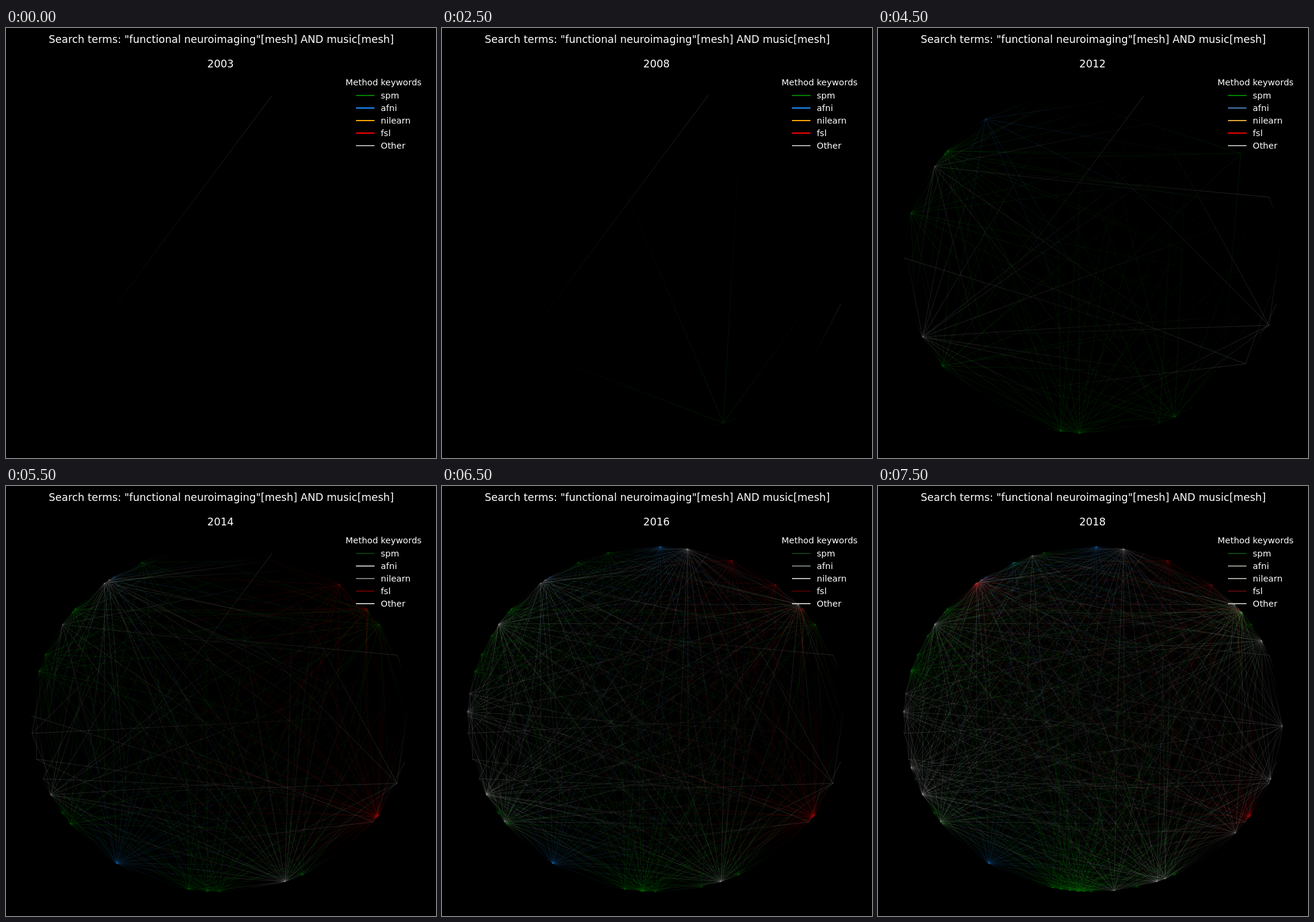
Write an HTML page with a canvas that moves like this. It is 720 px wide and 720 px high and loops after 8000 ms.

```html
<!DOCTYPE html>
<html lang="en">
<head>
<meta charset="utf-8">
<title>Search terms by year</title>
<style>
  html, body { margin: 0; width: 100%; height: 100%; overflow: hidden; background: #000; }
  canvas, svg { position: absolute; left: 0; top: 0; width: 720px; height: 720px; }
  text { font-family: "DejaVu Sans", Verdana, sans-serif; font-size: 14.48px; fill: #fff; }
  .big { font-size: 17.38px; text-anchor: middle; }
  #keys line { stroke-width: 2; }
</style>
</head>
<body>
<canvas id="net" width="720" height="720"></canvas>
<svg viewBox="0 0 720 720">
  <text class="big" x="360.5" y="25">Search terms: "functional neuroimaging"[mesh] AND music[mesh]</text>
  <text class="big" id="year" x="359.2" y="66">2003</text>
  <text x="568.6" y="96">Method keywords</text>
  <g id="keys"></g>
</svg>
<script>
const FIRST = 2003, STEPS = 16, STEP_MS = 500;
const SPM = { rgb: '0,128,0', alpha: 0.2 };
const AFNI = { rgb: '30,144,255', alpha: 0.15 };
const FSL = { rgb: '255,0,0', alpha: 0.14 };
const OTHER = { rgb: '169,169,169', alpha: 0.2 };

const ctx = document.getElementById('net').getContext('2d');
const yearText = document.getElementById('year');
const keys = document.getElementById('keys');
const links = [];

let seed = 41;
function rand() {
  seed = (seed * 16807) % 2147483647;
  return seed / 2147483647;
}

// Point on the ring, in degrees clockwise from the right.
function ring(deg) {
  const a = deg * Math.PI / 180;
  return [360 + 317.5 * Math.cos(a), 390.5 + 289 * Math.sin(a)];
}

function link(year, kind, from, to) {
  links.push({ year, kind, from: ring(from), to: ring(to) });
}

// Hubs at the given angles, each with n links spread around the ring.
function hubs(year, kind, n, ...angles) {
  for (const a of angles)
    for (let i = 0; i < n; i++)
      link(year, kind, a, a + 5 + 350 * (i + rand()) / n);
}

link(2003, OTHER, -74.3, 142.6);
hubs(2007, SPM, 6, 69.5);
link(2008, OTHER, 14.3, 35.4);
link(2009, OTHER, -21.8, 213.3);
link(2009, OTHER, -21.8, -16);
hubs(2009, SPM, 4, -38.8);
hubs(2009, SPM, 10, 218.4);
hubs(2009, OTHER, 9, 213.3);
hubs(2010, SPM, 17, 142.6);
link(2010, OTHER, 181.1, 36);
hubs(2011, OTHER, 6, 21.8);
hubs(2011, OTHER, 3, 36.5);
hubs(2011, SPM, 14, 196.2, 64.4);
hubs(2012, SPM, 18, 94.1, 99.8, 219.7);
hubs(2012, OTHER, 14, 154);
hubs(2012, AFNI, 9, 235.4);
hubs(2013, AFNI, 26, 123.4);
hubs(2013, FSL, 24, 34);
hubs(2013, SPM, 13, 90.5, -33.3, 202);
hubs(2013, OTHER, 4, 175.3);
hubs(2014, FSL, 14, -51.2, -39.7, 34.6);
hubs(2014, OTHER, 13, 232, 233.8);
hubs(2014, OTHER, 24, 70.3);
hubs(2014, OTHER, 3, 159.8, 166.6);
hubs(2014, SPM, 12, 245.4, 147);
hubs(2015, FSL, 16, -66.7);
hubs(2015, OTHER, 24, -80.7);
hubs(2015, OTHER, 7, 188.5);
hubs(2015, SPM, 12, 255, 76.5, 209);
hubs(2016, AFNI, 22, -89);
hubs(2016, OTHER, 17, -41.7, 213.5, 182.5, 143.6, 154.3);
hubs(2016, SPM, 20, 94.7);
hubs(2017, FSL, 32, 231.7);
hubs(2017, OTHER, 24, 163.6, -27);
hubs(2017, OTHER, 13, 251.3, 2.3);
hubs(2017, SPM, 20, 97);
hubs(2018, SPM, 18, 196.5, -38, 92.7, 102.3);
hubs(2018, OTHER, 16, 20.3, 41.2, 83.6, 67.6, -38.3);
hubs(2018, AFNI, 10, 245);

// Legend colours, each set valid from its year on.
const palettes = {
  2003: ['#008000', '#1e90ff', '#ffa500', '#ff0000', '#a9a9a9'],
  2012: ['#008000', '#4878ac', '#e2a73c', '#f00000', '#a9a9a9'],
  2014: ['#043a08', '#b4b8b8', '#747874', '#600000', '#b8bcbc'],
  2016: ['#0c3818', '#707878', '#b4b4ac', '#440000', '#bcbcb4'],
  2018: ['#0e420e', '#949084', '#a0a098', '#500a0a', '#acaca4']
};
const swatches = ['spm', 'afni', 'nilearn', 'fsl', 'Other'].map((name, i) => {
  const y = 113 + 21 * i;
  keys.insertAdjacentHTML('beforeend',
    `<line x1="586" x2="617" y1="${y}" y2="${y}"/><text x="627.5" y="${y + 5}">${name}</text>`);
  return keys.children[2 * i];
});

// Each link fades out from its hub to its far end.
function drawLink({ kind, from, to }) {
  const g = ctx.createLinearGradient(...from, ...to);
  g.addColorStop(0, `rgba(${kind.rgb},${kind.alpha})`);
  g.addColorStop(0.95, `rgba(${kind.rgb},0)`);
  ctx.strokeStyle = g;
  ctx.beginPath();
  ctx.moveTo(...from);
  ctx.lineTo(...to);
  ctx.stroke();
}

function show(year) {
  ctx.clearRect(0, 0, 720, 720);
  links.filter(l => l.year <= year).forEach(drawLink);
  yearText.textContent = year;
  const since = Object.keys(palettes).filter(y => y <= year).pop();
  swatches.forEach((s, i) => s.setAttribute('stroke', palettes[since][i]));
}

let shown = FIRST;
function tick(now) {
  const year = FIRST + Math.floor(now / STEP_MS) % STEPS;
  if (year !== shown) show(shown = year);
  requestAnimationFrame(tick);
}
show(shown);
requestAnimationFrame(tick);
</script>
</body>
</html>
```
